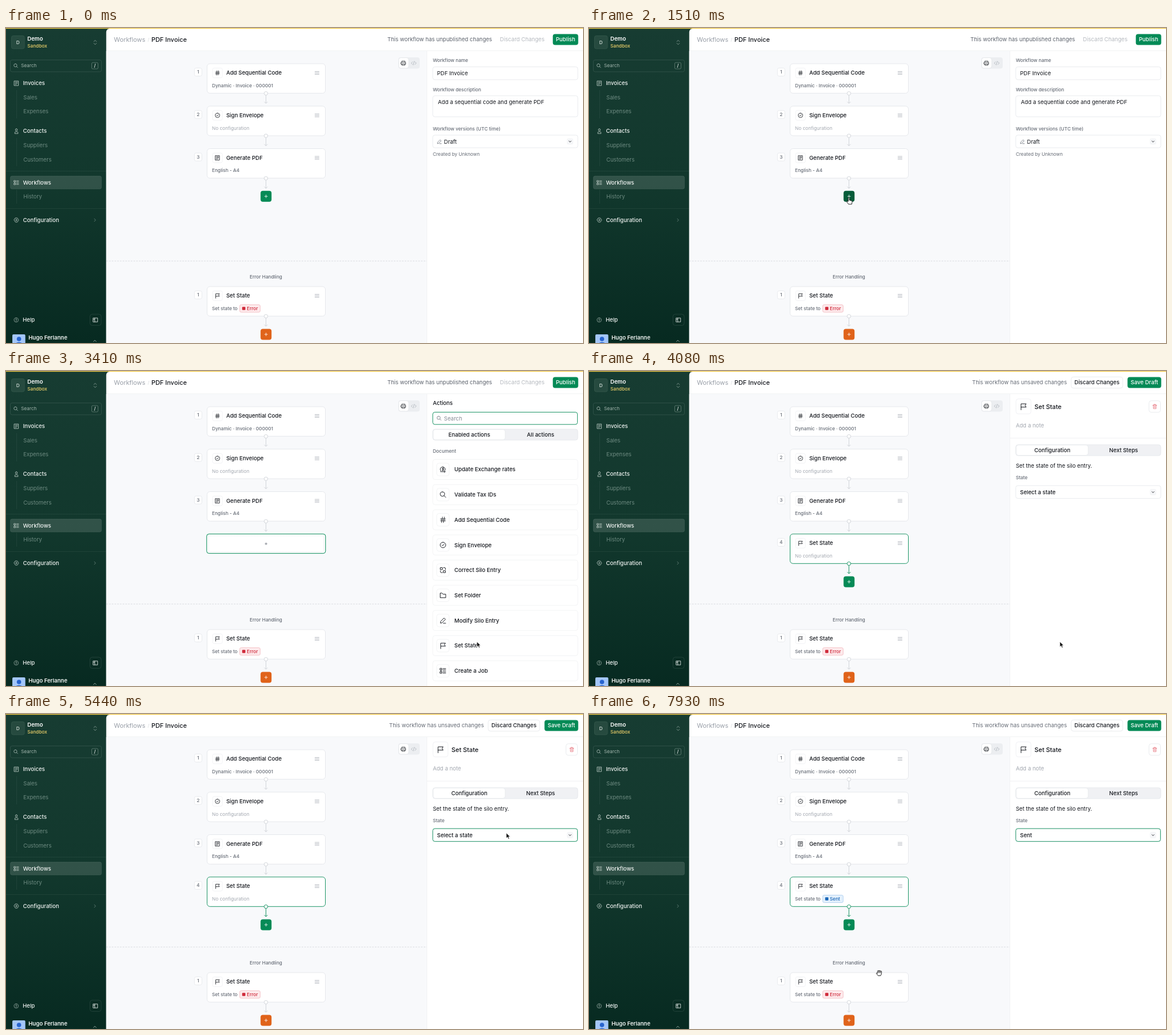
These frames come from a looping animation (1000 by 547 pixels, 7.99 s). An HTML page:

```html
<!DOCTYPE html>
<html lang="en">
<head>
<meta charset="utf-8">
<title>Workflow editor</title>
<style>
  html, body { margin: 0; height: 100%; overflow: hidden; background: #0b2f26; }
  svg { display: block; width: 100vw; height: 100vh; font-family: Inter, sans-serif; }
  text { white-space: pre; }
</style>
</head>
<body>
<svg id="stage" viewBox="0 0 1000 547"></svg>
<script>
const LOOP = 7990;
const GREEN = '#058a56', INK = '#15181e', GRAY = '#666c76', PALE = '#a3a8b0', EDGE = '#e4e6ea';

// Icons on a 24 unit grid
const ICONS = {
  hash: 'M3 9h18M3 15.500h18M10 2L7 22M17 2L14 22',
  check: 'M12 2a10 10 0 1 0 0 20a10 10 0 1 0 0-20M8 12l3 3 5-6',
  doc: 'M3 2h18v20H3zM7 7h10M7 12h10M7 17h5',
  menu: 'M2 5h20M2 12h20M2 19h20',
  flag: 'M4 23V3h17l-4 5.500 4 5.500H4',
  search: 'M10 2a8 8 0 1 0 0 16a8 8 0 1 0 0-16M16 16l6 6',
  pen: 'M3 21l1-6L16 3l5 5L9 20zM13 22h9',
  folder: 'M2 20V4h7l3 4h10v12z',
  swap: 'M3 3h7v7H3zM14 14h7v7h-7zM14 3h4a3 3 0 0 1 3 3v4M10 21H6a3 3 0 0 1-3-3v-4',
  flow: 'M2 3h6v6H2zM2 15h6v6H2zM5 9v6M12 4h10M12 9h10M12 15h10M12 20h10',
  user: 'M12 2a4.500 4.500 0 1 0 0 9a4.500 4.500 0 1 0 0-9M5 22v-3a4 4 0 0 1 4-4h6a4 4 0 0 1 4 4v3z',
  gear: 'M8 3h8l6 9-6 9H8l-6-9zM12 9a3 3 0 1 0 0 6a3 3 0 1 0 0-6',
  help: 'M12 2a10 10 0 1 0 0 20a10 10 0 1 0 0-20M9 10a3 3 0 1 1 3 3v2M12 17v1',
  side: 'M2 3h20v18H2zM9 3v18M4 8h3M4 12h3',
  trash: 'M3 6h18M8 6V2h8v4M5 6l1 16h12l1-16M10 11v6M14 11v6',
  print: 'M5 8V3h14v5M2 9h20v7H2zM5 16v5h14v-5',
  code: 'M7 6l-6 6 6 6M17 6l6 6-6 6M14 4l-4 16',
  coin: 'M4 17a9 9 0 1 1 15-1M15 8c-6-3-7 3-3 3s4 6-3 4M12 5v12M3 20h17l-3-3M20 20l-3 3',
  plus: 'M12 4v16M4 12h16',
  down: 'M5 9l7 7 7-7', right: 'M9 5l7 7-7 7', up: 'M5 15l7-7 7 7',
  sort: 'M6 8l6-6 6 6M6 16l6 6 6-6',
};

const text = (x, y, s, size = 9.55, fill = INK, weight = 400, anchor = 'start') =>
  `<text x="${x}" y="${y + size * .364}" font-size="${size}" fill="${fill}" font-weight="${weight}" text-anchor="${anchor}">${s}</text>`;
const small = (x, y, s, fill = GRAY, weight = 500, anchor) => text(x, y, s, 8.2, fill, weight, anchor);
const rect = (x, y, w, h, r, fill, stroke = 'none', sw = .8) =>
  `<rect x="${x}" y="${y}" width="${w}" height="${h}" rx="${r}" fill="${fill}" stroke="${stroke}" stroke-width="${sw}"/>`;
const path = (d, stroke, sw = .8, extra = '') =>
  `<path d="${d}" fill="none" stroke="${stroke}" stroke-width="${sw}" ${extra}/>`;
const icon = (name, x, y, size = 10, color = INK, sw = .85) => {
  const k = size / 24;
  return `<g transform="translate(${x - size / 2} ${y - size / 2}) scale(${k})">` +
    path(ICONS[name], color, sw / k, 'stroke-linecap="round" stroke-linejoin="round"') + '</g>';
};
const group = (id, ...parts) => `<g id="${id}">${parts.join('')}</g>`;

function sidebar() {
  const light = '#f1f5f3', dim = '#6d8a80', soft = '#a9bbb4', line = 'rgba(255,255,255,.08)';
  const head = (y, name, s) => icon(name, 18, y, 9.5, '#c5d2cc', .8) + text(29.5, y, s, 9.55, light, 500);
  const sub = (y, s) => text(30, y, s, 9.55, dim);
  return [
    rect(0, 0, 1000, 547, 0, 'url(#forest)'),
    rect(9.500, 13.500, 22.500, 22.500, 3, '#264a3f', '#355a4d'),
    text(20.700, 24.800, 'D', 8.2, '#d8e2dd', 500, 'middle'),
    text(37, 19, 'Demo', 9.55, '#fff', 600), small(37, 31, 'Sandbox', '#ecd069'),
    icon('sort', 154.500, 25, 9, soft, .7),
    rect(7.500, 55.500, 158, 20.500, 3, 'none', 'rgba(255,255,255,.13)'),
    icon('search', 17, 65.500, 8, soft, .8), small(26, 65.500, 'Search', '#a3b6ae', 400),
    rect(148.500, 60, 11, 11, 2, 'none', '#6f8a80', .7), small(154, 65.500, '/', light, 500, 'middle'),
    path('M18.500 108v49M18.500 191v49M18.500 281v24M0 248.500H174M0 313.500H174', line),
    head(96, 'doc', 'Invoices'), sub(120.500, 'Sales'), sub(145, 'Expenses'),
    head(179, 'user', 'Contacts'), sub(203.700, 'Suppliers'), sub(228.300, 'Customers'),
    rect(7.500, 257, 158, 22.500, 3, 'rgba(255,255,255,.13)', 'rgba(255,255,255,.1)'),
    head(268.500, 'flow', 'Workflows'), sub(293, 'History'),
    head(333.500, 'gear', 'Configuration'), icon('right', 154, 333.500, 8, dim),
    icon('help', 17.700, 507, 9, soft, .7), text(29, 507, 'Help', 9.55, light, 500),
    rect(145.500, 497, 19.500, 19.500, 4, 'none', 'rgba(255,255,255,.12)'), icon('side', 155, 507, 9, light, .8),
    rect(11, 532, 22.500, 22, 2, '#a3c6fa'),
    '<circle cx="22.500" cy="540" r="3.800" fill="#2764cf"/><ellipse cx="22.500" cy="551" rx="7.500" ry="5.500" fill="#2764cf"/>',
    text(39, 538, 'Hugo Ferlanne', 9.55, light, 600), icon('up', 154, 543.500, 8, soft),
  ].join('');
}

function link(y, color = '#cdd1d6') {
  return path(`M450.500 ${y}v17M447.500 ${y + 14.500}l3 3 3-3`, color, .9) +
    `<circle cx="450.500" cy="${y}" r="3.100" fill="#fff" stroke="${color}" stroke-width=".9"/>`;
}
const addButton = (y, fill, id = '') =>
  `<rect id="${id}" x="441.200" y="${y - 9.500}" width="19" height="19" rx="4" fill="${fill}"/>` + icon('plus', 450.700, y, 7.5, '#fff', .8);

function badge(y, s, ink, fill, edge) {
  return small(357, y, 'Set state to') + rect(405, y - 6.500, 35.500, 13, 2.500, fill, edge) +
    rect(409.300, y - 2.800, 5.600, 5.600, 1, ink) + small(417.300, y, s, ink);
}

function card(y, n, name, title, note, active) {
  return rect(326.500, y + 7.500, 13, 14, 3, '#fff', EDGE) + small(333, y + 14.500, n, GRAY, 500, 'middle') +
    rect(348.500, y, 205, 51.300, 5, '#fff', active ? GREEN : EDGE, .9) +
    rect(358, y + 7.500, 17, 17, 3, '#fff', '#eff0f3') + icon(name, 366.500, y + 16, 9.2) +
    text(381.700, y + 16, title, 9.55, INK, 500) + icon('menu', 539, y + 16, 8.5, PALE, .8) +
    (note ? small(357, y + 38, note, note[0] === 'N' ? PALE : GRAY, note[0] === 'N' ? 400 : 500) : '') +
    link(y + 51.500, active ? GREEN : undefined);
}

function canvas() {
  return [
    '<path d="M173.700 547V7a6 6 0 0 1 6-6H1000V547z" fill="#fff"/>',
    rect(0, 0, 1000, 1.2, 0, '#f3c944'),
    rect(173.700, 40, 555.300, 507, 0, '#f8f9fb'),
    path('M174 39.500H1000M729.500 40V547', '#eef0f2'),
    text(187, 20, 'Workflows', 10.85, '#989ea7'), text(245.500, 20, '/', 8, '#d5d8dc'),
    text(252, 20, 'PDF Invoice', 10.85, INK, 500),
    rect(680, 51, 37, 19.500, 4, '#eceef1'), rect(680.500, 51.500, 17.500, 18.500, 4, '#fff', '#e1e4e8'),
    icon('print', 688.700, 61, 9.5, INK, .75), icon('code', 706.700, 61, 9.5, PALE, .7),
    card(62, 1, 'hash', 'Add Sequential Code', 'Dynamic · Invoice · 000001'),
    card(135.700, 2, 'check', 'Sign Envelope', 'No configuration'),
    card(209.500, 3, 'doc', 'Generate PDF', 'English - A4'),
    path('M174 404.700H729', '#d6d9dd', .9, 'stroke-dasharray="2.700 2"'),
    small(450.500, 432.500, 'Error Handling', GRAY, 500, 'middle'),
    card(449, 1, 'flag', 'Set State'), badge(487, 'Error', '#d02b3b', '#fdeaec', '#f3b9be'),
    addButton(532, '#e0631a'),
  ].join('');
}

const field = (y, h, s, x = 747) => rect(739.700, y, 251.300, h, 3.5, '#fff', EDGE) + text(x, y + 11.300, s);
const chevron = y => rect(972, y - 5.500, 11, 11, 3, '#f5f6f8') + icon('down', 977.500, y, 6.5, INK, .9);
const tabs = (y, a, b) => rect(739.700, y, 251.300, 19, 4, '#f0f1f4', EDGE) +
  rect(740.200, y + .5, 125, 18, 4, '#fff', EDGE) +
  text(803, y + 9.700, a, 9.55, INK, 500, 'middle') + text(926.500, y + 9.700, b, 9.55, INK, 500, 'middle');
const mainButton = (x, w, s) => rect(x, 10.600, w, 18.900, 4, GREEN) + text(x + w / 2, 20, s, 9.55, '#fff', 500, 'middle');
const unpublished = () => text(661, 20, 'This workflow has unpublished changes', 9.55, '#5d636d') +
  text(856, 20, 'Discard Changes', 9.55, '#b5b9bf') + mainButton(947.700, 44, 'Publish');

const overview = () => group('overview',
  unpublished(), addButton(292.300, GREEN, 'add'),
  small(739.700, 56, 'Workflow name'), field(67.500, 22.300, 'PDF Invoice'),
  small(739.700, 106.700, 'Workflow description'), field(117.700, 36.500, 'Add a sequential code and generate PDF', 748.500),
  small(739.700, 175, 'Workflow versions (UTC time)'), field(186, 22, 'Draft', 759),
  icon('pen', 751, 197.300, 8.5, GRAY, .8), chevron(197),
  small(739.700, 219, 'Created by Unknown', GRAY, 400));

const ACTIONS = [['coin', 'Update Exchange rates'], ['search', 'Validate Tax IDs'], ['hash', 'Add Sequential Code'],
  ['check', 'Sign Envelope'], ['swap', 'Correct Silo Entry'], ['folder', 'Set Folder'],
  ['pen', 'Modify Silo Entry'], ['flag', 'Set State'], ['flow', 'Create a Job']];

const picker = () => group('picker',
  unpublished(),
  rect(347.800, 283, 206, 33.700, 4, '#fff', GREEN, 1),
  `<g stroke-dasharray="1.500 1">${rect(351, 286, 199.500, 27.700, 3, 'none', '#d9dce0', .6)}</g>`,
  icon('plus', 450.700, 300, 5.5, GRAY, .8),
  text(739.700, 56, 'Actions', 9.55, INK, 500),
  rect(739.700, 71.500, 250.700, 21.300, 3.5, '#fff', GREEN, .9),
  icon('search', 750.500, 82, 8.5, GRAY, .8), text(759, 82.200, 'Search', 9.55, '#858b94'),
  tabs(101, 'Enabled actions', 'All actions'), small(739.700, 139.500, 'Document'),
  ...ACTIONS.map(([name, s], i) => {
    const y = 171 + i * 43.7;
    return rect(739.700, y - 17.500, 251.300, 35, 4, '#fff', '#f0f1f3') +
      rect(746.500, y - 11, 21.500, 22, 4, '#fff', '#eff0f2') +
      icon(name, 757.300, y, 11.5, INK, .95) + text(777, y, s, 9.55, INK, 500);
  }));

const editor = () => group('editor',
  text(664, 20, 'This workflow has unsaved changes', 9.55, '#666c76'),
  rect(835.700, 10.300, 89.300, 19.500, 4, '#fff', EDGE), text(880.300, 20, 'Discard Changes', 9.55, INK, 500, 'middle'),
  mainButton(933.300, 58.400, 'Save Draft'),
  card(283, 4, 'flag', 'Set State', '', true), addButton(366, GREEN),
  rect(740, 48.500, 26, 26, 4, '#fff', '#eceef1'), icon('flag', 753, 61.700, 12.5, INK, 1),
  text(772, 61.700, 'Set State', 10.9, INK, 500),
  rect(970.500, 51.700, 20, 20, 4, '#fff', EDGE), icon('trash', 980.500, 61.700, 9, '#e0525f', .65),
  text(739.700, 95, 'Add a note', 9.55, PALE), path('M730 116.500H1000', '#eceef1'),
  tabs(128, 'Configuration', 'Next Steps'),
  text(739.700, 164.700, 'Set the state of the silo entry.', 9.55),
  small(739.700, 185, 'State'), field(199, 22.300, ''),
  group('focus', rect(739.700, 199, 250.700, 22.300, 3.5, '#fff', GREEN, .9)), chevron(210.300),
  group('unset', small(357, 321, 'No configuration', PALE, 400), text(747, 210.500, 'Select a state', 9.55, INK, 500)),
  group('sent', badge(321, 'Sent', '#1a67b8', '#e3f0fc', '#abcdef'), text(747, 210.500, 'Sent', 9.55, INK, 500)));

// Pointers, drawn from their hot spot
const cursors = () => group('cursor',
  '<path id="arrow" d="M0 0V9.300L2.200 7.300 3.700 10.800 5.400 10.100 3.900 6.700H6.800z" fill="#111" stroke="#fff" stroke-width=".800"/>',
  '<path id="point" d="M-1 1Q0-.8 1 1V4.500L5 5.500Q6 6 5.700 8L5 11.500H-.500L-3.500 7.500Q-4 6-1 6.500z" fill="#fff" stroke="#111" stroke-width=".900"/>',
  '<path id="grab" d="M-2.500 1V-3Q-1.700-5-.8-3.500 0-5.500 1-3.500 2.200-5 2.800-3 4.500-4 4.500-1.500L4 2.500 2.800 5H-1.500L-4.500 1Q-4.500-1-2.500 1zM-.8-3.500V0M1-3.500V0M2.800-3V0" fill="#fff" stroke="#111" stroke-width=".900"/>');

const stage = document.getElementById('stage');
stage.innerHTML = `<defs><linearGradient id="forest" x1="0" y1="0" x2=".04" y2="1">
  <stop offset="0" stop-color="#173c32"/><stop offset=".5" stop-color="#12382d"/><stop offset="1" stop-color="#072a21"/>
  </linearGradient></defs>` + sidebar() + canvas() + overview() + picker() + editor() + cursors();

const $ = id => document.getElementById(id);
const show = (id, on) => $(id).style.display = on ? '' : 'none';

// time, x, y, pointer shape from then on
const TRACK = [
  [850, 690, 420, 'grab'], [1380, 450.3, 294.5, 'point'], [1900, 450.3, 294.5, 'arrow'],
  [2450, 554.5, 259, 'arrow'], [2550, 554.5, 259, 'arrow'], [3350, 816, 470, 'arrow'],
  [4250, 816, 470, 'arrow'], [4850, 867, 206.5, 'arrow'], [7250, 867, 206.5, 'arrow'],
  [7600, 700, 318, 'grab'], [7880, 502.5, 449.5, 'grab'], [LOOP, 502.5, 449.5, 'grab'],
];

function moveCursor(t) {
  const i = TRACK.findIndex(k => k[0] > t);
  show('cursor', i > 0);
  if (i < 1) return;
  const [t0, x0, y0, shape] = TRACK[i - 1], [t1, x1, y1] = TRACK[i];
  const u = (t - t0) / (t1 - t0), e = u * u * (3 - 2 * u);
  $('cursor').setAttribute('transform', `translate(${x0 + (x1 - x0) * e} ${y0 + (y1 - y0) * e})`);
  for (const id of ['arrow', 'point', 'grab']) show(id, id === shape);
}

function draw() {
  const t = performance.now() % LOOP;
  show('overview', t < 1620);
  show('picker', t >= 1620 && t < 3650);
  show('editor', t >= 3650);
  show('focus', t >= 4920);
  show('unset', t < 7200);
  show('sent', t >= 7200);
  $('add').setAttribute('fill', t > 1360 ? '#075c3a' : GREEN);
  moveCursor(t);
  requestAnimationFrame(draw);
}
draw();
</script>
</body>
</html>
```
